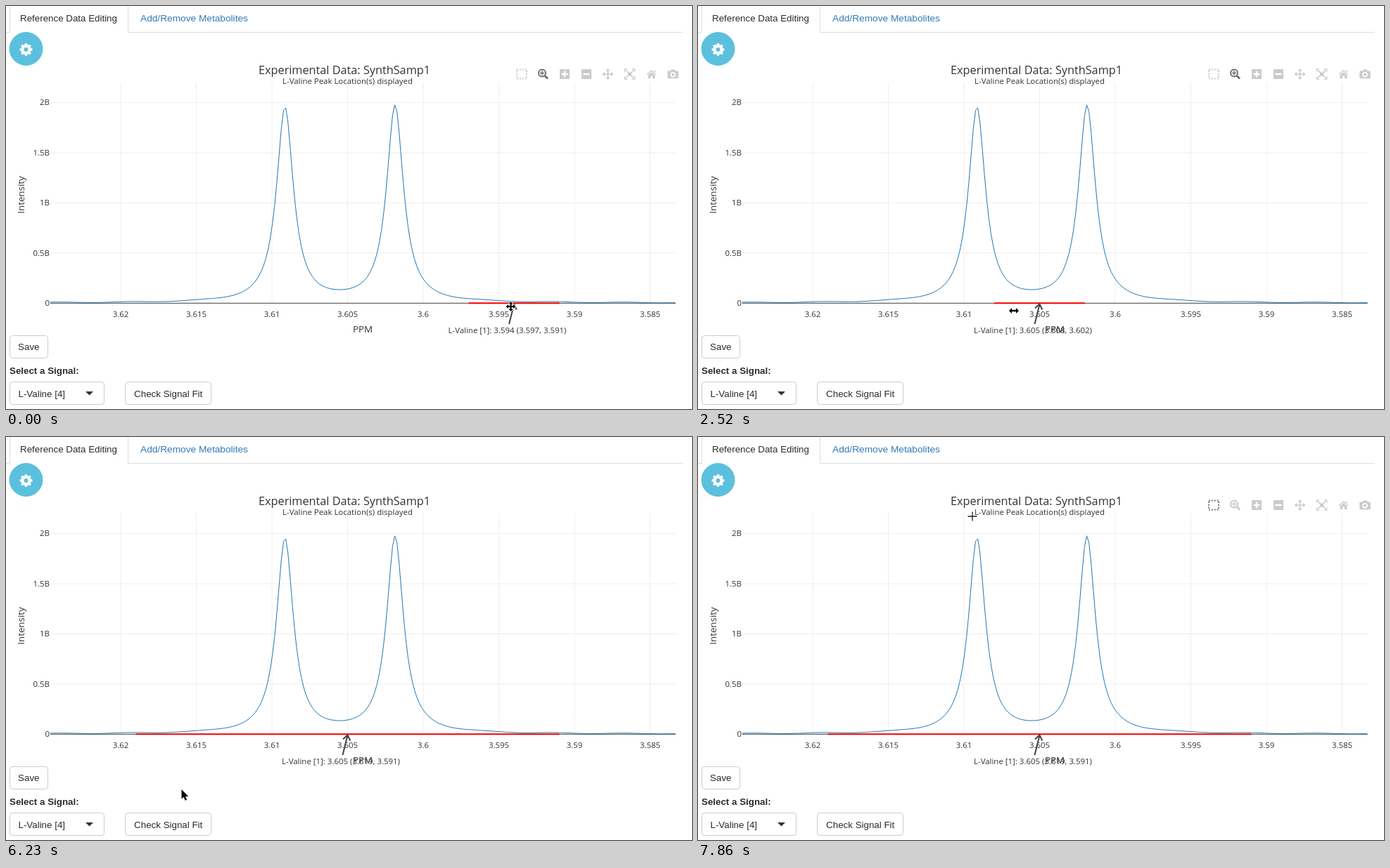
These frames come from a looping animation (975 px wide and 574 px high, 8000 ms). An HTML page:

```html
<!DOCTYPE html>
<html lang="en">
<head>
<meta charset="utf-8">
<title>Reference data editing</title>
<style>
  html, body { margin: 0; width: 100%; height: 100%; overflow: hidden; background: #fff; }
  svg { display: block; width: 975px; height: 574px; }
  text { font: 13.35px "Liberation Sans", Arial, sans-serif; fill: #2b2b2b; white-space: pre; }
  .chart text { font: 11.44px "Open Sans", "Noto Sans", sans-serif; fill: #333; }
  .chart .title { font-size: 16.25px; }
  .chart .axis { font-size: 13.35px; }
  .chart .hint { fill: #fff; }
  .link { font-size: 13.7px; fill: #337ab7; }
  .strong { font-weight: 700; }
  .mid { text-anchor: middle; }
  .end { text-anchor: end; }
  .line { fill: none; stroke: #ddd; }
  .button { fill: #fff; stroke: #ccc; }
  .grid { stroke: #eee; }
  .icon { fill: #444; opacity: .28; }
  .icon.on { opacity: .75; }
  .stroke { fill: none; stroke: #444; stroke-width: 2; }
  .thin { stroke-width: 1.6; }
  .cursor { visibility: hidden; }
</style>
</head>
<body>
<svg viewBox="0 0 975 574">
  <path class="line" d="M0 37.5H5.5V0M173.5 0V37.5H962"/>
  <text x="20" y="22">Reference Data Editing</text>
  <text class="link" x="191" y="22">Add/Remove Metabolites</text>

  <circle cx="28.5" cy="61" r="23.4" fill="#5bc0de" stroke="#46b8da" stroke-width=".9"/>
  <g transform="translate(28.5 62)" fill="none" stroke="#fff">
    <circle r="5.2" stroke-width="4.4"/>
    <circle r="7.6" stroke-width="2.8" pathLength="16" stroke-dasharray="1 1" stroke-dashoffset=".5"/>
  </g>

  <rect class="button" x="5.5" y="469.5" width="54" height="32" rx="4"/>
  <text class="mid" x="32.3" y="490">Save</text>
  <text class="strong" x="5" y="523.5">Select a Signal:</text>
  <rect class="button" x="5.5" y="535.5" width="134" height="32" rx="4"/>
  <text x="17.5" y="556.5">L-Valine [4]</text>
  <path d="M113 549h11l-5.5 5.5z" fill="#333"/>
  <rect class="button" x="169.5" y="535.5" width="122" height="32" rx="4"/>
  <text class="mid" x="230.7" y="556.5">Check Signal Fit</text>

  <g class="chart">
    <g id="axes"></g>
    <path d="M63 423.3H952" stroke="#444"/>
    <path id="curve" fill="none" stroke="#1f77b4" stroke-linejoin="round"/>
    <path id="range" stroke="#f00" stroke-width="2"/>
    <text class="title mid" x="481" y="97">Experimental Data: SynthSamp1</text>
    <text class="mid" x="485.5" y="110.7">L-Valine Peak Location(s) displayed</text>
    <text class="axis mid" x="507" y="465.3">PPM</text>
    <text class="axis mid" transform="translate(25.7 269) rotate(-90)">Intensity</text>
    <g id="note">
      <path class="stroke" d="M-7 453L0 425M-6.5 430.5L0 424.5L3.8 432.5"/>
      <text class="mid" x="-9.5" y="466.3"></text>
    </g>

    <g id="bar">
      <g class="icon" id="select" transform="translate(733 97)">
        <rect class="stroke" x="-7" y="-6.5" width="14" height="13" stroke-dasharray="2 1.9"/>
      </g>
      <g class="icon" id="zoom" transform="translate(763.5 97)">
        <circle class="stroke" cx="-1.5" cy="-1.5" r="5"/>
        <path class="stroke" d="M2.5 2.5L6.5 6.5" style="stroke-width:3"/>
        <path class="stroke thin" d="M-4.5-1.5h6M-1.5-4.5v6"/>
      </g>
      <path class="icon" transform="translate(794 97)" fill-rule="evenodd" d="M-7-7H7V7H-7zM-1.2-4.5v3.3h-3.3v2.4h3.3v3.3h2.4v-3.3h3.3v-2.4h-3.3v-3.3z"/>
      <path class="icon" transform="translate(825 97)" fill-rule="evenodd" d="M-7-7H7V7H-7zM-4.5-1.2v2.4h9v-2.4z"/>
      <g class="icon" transform="translate(855.5 97)">
        <path class="stroke thin" d="M-6 0H6M0-6V6"/>
        <path d="M0-8l3 3.5h-6zM0 8l3-3.5h-6zM-8 0l3.5-3v6zM8 0l-3.5-3v6z"/>
      </g>
      <g class="icon" transform="translate(886.5 97)">
        <path class="stroke thin" d="M-7-3.5V-7H-3.5M3.5-7H7V-3.5M7 3.5V7H3.5M-3.5 7H-7V3.5M-5-5L5 5M5-5L-5 5"/>
        <circle r="2.6"/>
      </g>
      <path class="icon" transform="translate(917.5 97)" d="M0-6L7 .3l-1 1L0-4-6 1.3l-1-1zM3.5-5.5h2v3l-2-1.8zM0-2.8L5 1.7V6H1.5V2.3h-3V6H-5V1.7z"/>
      <path class="icon" transform="translate(948 97)" fill-rule="evenodd" d="M-6.5-4.5h3l1-2h5l1 2h3q1.2 0 1.2 1.2V5q0 1.2-1.2 1.2h-13Q-7.7 6.2-7.7 5v-8.3q0-1.2 1.2-1.2zM0-3.2a3.9 3.9 0 1 0 .01 0zM0-1.4a2.1 2.1 0 1 1-.01 0z"/>
    </g>
    <g id="hint">
      <path d="M728 113l5-5 5 5z" fill="#69738a"/>
      <rect x="676" y="113" width="74" height="28" rx="2" fill="#69738a"/>
      <text class="hint mid" x="712.7" y="131.3">Box Select</text>
    </g>
  </g>

  <g stroke="#fff" stroke-linejoin="round" paint-order="stroke" stroke-width="1.6">
    <path class="cursor" id="arrow" d="M0 0V13.5L3 10.7L5.2 15.7L7.6 14.7L5.5 9.9H9.7z"/>
    <path class="cursor" id="move" d="M0-7l3 3.5H1V-1H3.5V-3L7 0L3.5 3V1H1V3.5H3L0 7L-3 3.5H-1V1H-3.5V3L-7 0L-3.5-3V-1H-1V-3.5H-3z"/>
    <path class="cursor" id="resize" d="M-7 0l4-4v2.7H3V-4L7 0L3 4V1.3H-3V4z"/>
    <path class="cursor" id="cross" stroke="#222" stroke-width="1.3" d="M-6.5 0H6.5M0-6.5V6.5"/>
    <path class="cursor" id="hand" fill="#fff" stroke="#000" paint-order="normal" d="M-3.5-5.5Q-3.3-7.3-2-7.3T-.5-5.5L.2-1.8Q1.5-2.8 2.7-1.3Q4-2 5-.4Q7-.8 7.3 1.5Q7.6 4 6.3 6V8.5H-1.2Q-2 6-5.3 2.6Q-6.7 1-5.6.3T-2.3 1.8zM1 3.3V6M3 3.3V6M5 3.3V6"/>
  </g>
</svg>
<script>
const BEAT = 148, LOOP = 8000;
const $ = id => document.getElementById(id);
const ppmX = ppm => 593 + (3.6 - ppm) * 21500;
const show = (id, on) => { $(id).style.visibility = on ? 'visible' : 'hidden'; };

function drawAxes() {
  let svg = '';
  for (let i = 0; i < 8; i++) {
    const ppm = +(3.62 - i * 0.005).toFixed(3), x = ppmX(ppm);
    svg += `<path class="grid" d="M${x} 109V423"/><text class="mid" x="${x}" y="443.2">${ppm}</text>`;
  }
  for (let i = 0; i < 5; i++) {
    const y = 423.2 - i * 71.4;
    svg += `<path class="grid" d="M63 ${y}H952"/><text class="end" x="62" y="${y + 3.8}">${i ? i / 2 + 'B' : 0}</text>`;
  }
  $('axes').innerHTML = svg;
}

// Two Lorentzian peaks over a faint ripple, sampled at an even spacing.
function drawCurve() {
  const peak = (x, centre, height) => height / (1 + ((x - centre) / 14.5) ** 2);
  const points = [];
  for (let x = 62.7; x < 953; x += 3.16) {
    const y = 423 - peak(x, 396.5, 277) - peak(x, 552.9, 280) + 0.5 * Math.sin(x / 16);
    points.push(`${x} ${y}`);
  }
  $('curve').setAttribute('d', 'M' + points.join('L'));
}

const linear = u => u;
const smooth = u => u * u * (3 - 2 * u);
const easeOut = u => 1 - (1 - u) ** 3;

// Pointer stops: beat, x, y and the easing of the way there.
const stops = [
  [0, 717.5, 428], [2, 717.5, 428], [11.2, 480.5, 430, smooth], [15, 480.5, 430],
  [17, 449, 434], [21, 416, 424], [22, 416, 424], [33, 180, 422, easeOut], [35, 180, 422],
  [36, 188, 428], [40, 244, 518], [42, 249.5, 502], [43, 481, 415], [46, 733, 103],
  [49, 733, 102], [51, 314, 181], [53, 390, 113]
];
const cursors = [[0, 'move'], [3, 'arrow'], [16, 'move'], [17, 'resize'], [23, 'arrow'],
  [36, 'resize'], [37, 'arrow'], [43, 'cross'], [46, 'hand'], [50, 'cross']];
const toolbar = [[0, 1], [3, 0], [16, 1], [23, 0], [36, 1], [38, 0], [43, .4], [44, 1]];
const notes = [[0, 3.594, '3.597, 3.591'], [16, 3.605, '3.608, 3.602'], [36, 3.605, '3.619, 3.591']];

const held = (keys, beat) => keys.findLast(k => k[0] <= beat);

function pointerAt(beat) {
  const a = held(stops, beat), b = stops[stops.indexOf(a) + 1];
  if (!b) return [a[1], a[2]];
  const u = (b[3] || linear)((beat - a[0]) / (b[0] - a[0]));
  return [a[1] + (b[1] - a[1]) * u, a[2] + (b[2] - a[2]) * u];
}

// First the whole range follows the pointer, then only its left edge.
function rangeAt(beat, x) {
  if (beat < 16) return [x - 59.9, x + 69.1];
  const right = ppmX(beat < 36 ? 3.602 : 3.591);
  if (beat < 21) return [ppmX(3.608), right];
  return [beat < 33 ? x + 5 : ppmX(3.619), right];
}

function draw(beat) {
  const [x, y] = pointerAt(beat), [left, right] = rangeAt(beat, x);
  $('range').setAttribute('d', `M${left} 423.3H${right}`);

  const [, ppm, bounds] = held(notes, beat);
  $('note').setAttribute('transform', `translate(${ppmX(ppm)} 0)`);
  $('note').lastElementChild.textContent = `L-Valine [1]: ${ppm} (${bounds})`;

  $('bar').style.opacity = held(toolbar, beat)[1];
  $('select').classList.toggle('on', beat >= 46);
  $('zoom').classList.toggle('on', beat < 49);
  show('hint', beat >= 46 && beat < 50);

  const kind = held(cursors, beat)[1];
  for (const el of document.querySelectorAll('.cursor')) show(el.id, el.id === kind);
  $(kind).setAttribute('transform', `translate(${x} ${y})`);
}

drawAxes();
drawCurve();
const start = performance.now();
let drawn = -1;
function frame() {
  const beat = Math.floor((performance.now() - start) % LOOP / BEAT);
  if (beat !== drawn) draw(drawn = beat);
  requestAnimationFrame(frame);
}
frame();
</script>
</body>
</html>
```
